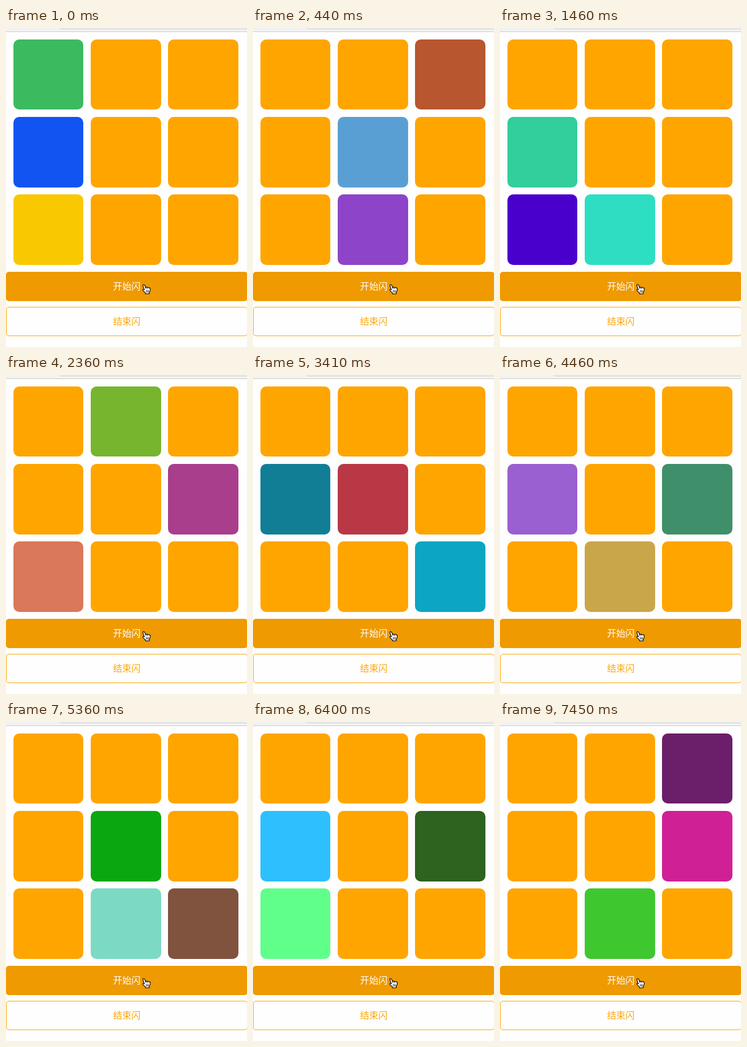
These frames come from a looping animation (421 px wide and 556 px high, 8 s). An HTML page with a canvas:

```html
<!DOCTYPE html>
<html lang="zh-CN">
<head>
<meta charset="utf-8">
<title>九宫格</title>
<style>
  html, body { margin: 0; width: 100%; height: 100%; overflow: hidden; background: #fefefe; }
  canvas { display: block; }
</style>
</head>
<body>
<canvas id="stage" width="421" height="556"></canvas>
<script>
const ctx = document.getElementById('stage').getContext('2d');
const LOOP = 8000;
const ORANGE = '#ffa500';
const COLS = [[13, 122], [148, 123], [283, 123]];
const ROWS = [[20, 122], [155, 123], [290, 123]];

// Each step lights three cells, numbered row by row.
const STEPS = [
  { at: 0,    lit: { 0: '#3cba60', 3: '#1254f2', 6: '#fac800' } },
  { at: 440,  lit: { 2: '#b8562f', 4: '#5a9fd4', 7: '#8e44c9' } },
  { at: 1460, lit: { 3: '#32ce9c', 6: '#4a00cd', 7: '#2ddec2' } },
  { at: 2360, lit: { 1: '#77b52e', 5: '#a83e8c', 6: '#d9785a' } },
  { at: 3410, lit: { 3: '#127e96', 4: '#ba3845', 8: '#0ca6c2' } },
  { at: 4460, lit: { 3: '#9a5fd0', 5: '#3f8f6a', 7: '#c9a64a' } },
  { at: 5360, lit: { 4: '#0aa80e', 7: '#7cdac3', 8: '#80533e' } },
  { at: 6400, lit: { 3: '#2ec0fe', 5: '#2e621f', 6: '#60ff8a' } },
  { at: 7450, lit: { 2: '#6b1f6b', 5: '#d02096', 7: '#3fc72f' } }
];

function box(x, y, w, h, r, fill, stroke) {
  ctx.beginPath();
  ctx.roundRect(x, y, w, h, r);
  if (fill) { ctx.fillStyle = fill; ctx.fill(); }
  if (stroke) { ctx.strokeStyle = stroke; ctx.lineWidth = 1; ctx.stroke(); }
}

function label(text, y, color) {
  ctx.font = '16px "Noto Sans CJK SC", "Noto Sans CJK", sans-serif';
  ctx.textAlign = 'center';
  ctx.textBaseline = 'alphabetic';
  ctx.fillStyle = color;
  ctx.fillText(text, 211, y);
}

function toolbar() {
  ctx.fillStyle = '#f2f2f2';
  ctx.fillRect(0, 0, 421, 6);
  ctx.fillStyle = '#cbcbcb';
  ctx.fillRect(0, 6, 421, 1);
  box(93.5, -10.5, 340, 12, 3, '#fff', '#c6c6c6');
}

function hand() {
  const shape = new Path2D(
    'M239 448.6C239 447 241.6 446.8 242.3 448.5L244 452.6' +
    'C244.6 451.2 246.6 451.3 247 452.6C247.9 451.5 249.5 452 249.8 453.2' +
    'C250.9 452.5 252 453.2 252 454.6C252.2 457.6 251.3 459.2 250.3 460.8L250.2 463.2' +
    'L243.8 463.4L243.2 461.4L239.3 457.6C238.2 456.2 239.6 454.9 241 455.8L241.8 456.4Z');
  ctx.lineJoin = ctx.lineCap = 'round';
  ctx.fillStyle = '#fff';
  ctx.fill(shape);
  ctx.strokeStyle = '#000';
  ctx.lineWidth = 1.2;
  ctx.stroke(shape);
  ctx.lineWidth = 0.8;
  ctx.beginPath();
  for (const x of [244.9, 246.9, 248.9]) {
    ctx.moveTo(x, 457.2);
    ctx.lineTo(x + 0.2, 460.8);
  }
  ctx.moveTo(244, 452.6);
  ctx.lineTo(244.6, 454.6);
  ctx.moveTo(247, 452.6);
  ctx.lineTo(247.3, 454.6);
  ctx.stroke();
}

function draw(t) {
  ctx.fillStyle = '#fefefe';
  ctx.fillRect(0, 0, 421, 556);
  toolbar();

  const { lit } = STEPS.filter(s => s.at <= t).pop();
  ROWS.forEach(([y, h], r) => COLS.forEach(([x, w], c) =>
    box(x, y, w, h, 10, lit[r * 3 + c] || ORANGE)));

  box(0, 425, 422, 51, 5, '#ee9a00');
  label('开始闪', 456, '#fff');
  box(0.5, 486.5, 421, 50, 4.5, '#fefefe', ORANGE);
  label('结束闪', 517, ORANGE);
  hand();
}

const start = performance.now();
function tick() {
  draw((performance.now() - start) % LOOP);
  requestAnimationFrame(tick);
}
tick();
</script>
</body>
</html>
```
